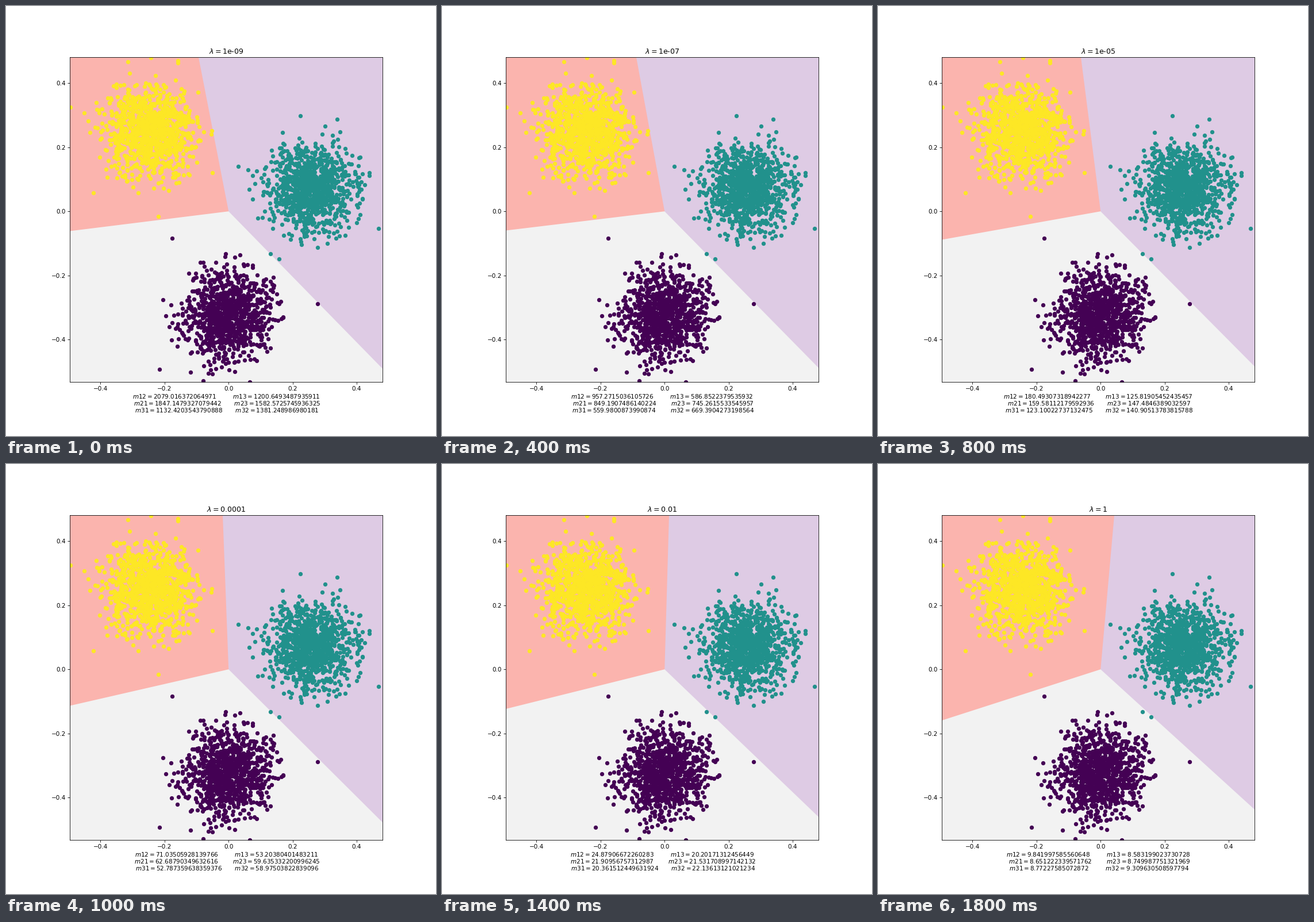
Animation, 748 px wide and 748 px high, one loop 2000 ms. Source, as a matplotlib script:

```python
import numpy as np
import matplotlib.pyplot as plt
from matplotlib.animation import FuncAnimation

SIZE = 748
LEFT, RIGHT, TOP, BOTTOM = 111.2, 655.1, 89.4, 654.2
ORIGIN = np.array([387.2, 357.2])
SCALE = 557.2   # pixels per data unit
FRAMES = 10

# Key poses: the first weight, and where the rays meet the sides in pixels.
KEYS = [0, 2, 4, 5, 7, 9]
M12 = [2079.016372064971, 957.2715036105726, 180.49307318942277,
       71.03505928139766, 24.87906672260283, 9.841997585560648]
RAY_TOP = [335, 338, 353, 377, 395, 411]
RAY_LEFT = [391.5, 390.5, 406.5, 420.5, 426, 446]
RAY_RIGHT = [631, 629.5, 627, 623.5, 614, 601]

# Each weight is gain * m12 ** power.
POWER_LAWS = {
    "m12": (1, 1), "m13": (1.04, 0.923),
    "m21": (0.875, 1.002), "m23": (0.95, 0.971),
    "m31": (1.1, 0.908), "m32": (1.1, 0.934),
}

# Centre, colour and a few far points of each cluster, in pixels.
CLUSTERS = [
    ((386, 537), "#440154", [(289, 404), (542, 518), (267, 632), (321, 637),
                             (273, 511), (343, 652), (424, 654)]),
    ((531, 315), "#21918c", [(404, 279), (421, 285), (512, 191), (576, 197),
                             (648, 387), (475, 440), (460, 431), (659, 357)]),
    ((250, 219), "#fde725", [(265, 366), (152, 325), (359, 290), (112, 176),
                             (299, 95), (299, 99), (252, 90), (212, 97),
                             (136, 186)]),
]


def to_data(points):
    return (np.asarray(points, float) - ORIGIN) * [1, -1] / SCALE


def cloud(rng, center, count=1000, sigma=38, reach=2.9):
    """Gaussian cloud cut off at `reach` standard deviations."""
    u = rng.uniform(np.exp(-reach ** 2 / 2), 1, count)
    radius = sigma * np.sqrt(-2 * np.log(u))
    angle = rng.uniform(0, 2 * np.pi, count)
    return center + radius[:, None] * np.column_stack([np.cos(angle), np.sin(angle)])


def weight_lines(m12):
    values = {name: repr(float(gain * m12 ** power))
              for name, (gain, power) in POWER_LAWS.items()}
    lines = []
    for first, second in (("m12", "m13"), ("m21", "m23"), ("m31", "m32")):
        indent = " " if lines else ""
        gap = " " * (26 - len(indent) - len(values[first]))
        lines.append(f"{indent}${first}={values[first]}${gap}"
                     f"${second}={values[second]}$")
    return lines


plt.rcParams["font.family"] = "DejaVu Sans"
fig = plt.figure(figsize=(10, 10), dpi=SIZE / 10, facecolor="white")
ax = fig.add_axes([LEFT / SIZE, 1 - BOTTOM / SIZE,
                   (RIGHT - LEFT) / SIZE, (BOTTOM - TOP) / SIZE])
ax.set_facecolor("#f2f2f2")
(x0, y0), (x1, y1) = to_data([(LEFT, BOTTOM), (RIGHT, TOP)])
ticks = np.arange(-2, 3) / 5
ax.set(xlim=(x0, x1), ylim=(y0, y1), xticks=ticks, yticks=ticks)

lavender, = ax.fill([0, 0, 1], [0, 1, 1], color="#decbe4", lw=0, zorder=0.5)
salmon, = ax.fill([0, 0, 1], [0, 1, 1], color="#fbb4ae", lw=0, zorder=0.6)

rng = np.random.default_rng(7)
for center, color, far in CLUSTERS:
    points = to_data(np.vstack([cloud(rng, center), far]))
    ax.scatter(points[:, 0], points[:, 1], color=color)

labels = [fig.text((LEFT + RIGHT) / 2 / SIZE, 1 - (683 + 12 * row) / SIZE, "",
                   ha="center", va="baseline") for row in range(3)]


def update(step):
    m12, top, left, right = (np.interp(step, KEYS, track)
                             for track in (M12, RAY_TOP, RAY_LEFT, RAY_RIGHT))
    corner = (LEFT, TOP)
    lavender.set_xy(to_data([ORIGIN, corner, (RIGHT, TOP), (RIGHT, right)]))
    salmon.set_xy(to_data([ORIGIN, (top, TOP), corner, (LEFT, left)]))
    ax.set_title(rf"$\lambda=${10.0 ** (step - 9):g}")
    for label, line in zip(labels, weight_lines(m12)):
        label.set_text(line)
    return lavender, salmon, *labels


anim = FuncAnimation(fig, update, frames=FRAMES, interval=200, repeat=True)
plt.show()
```
